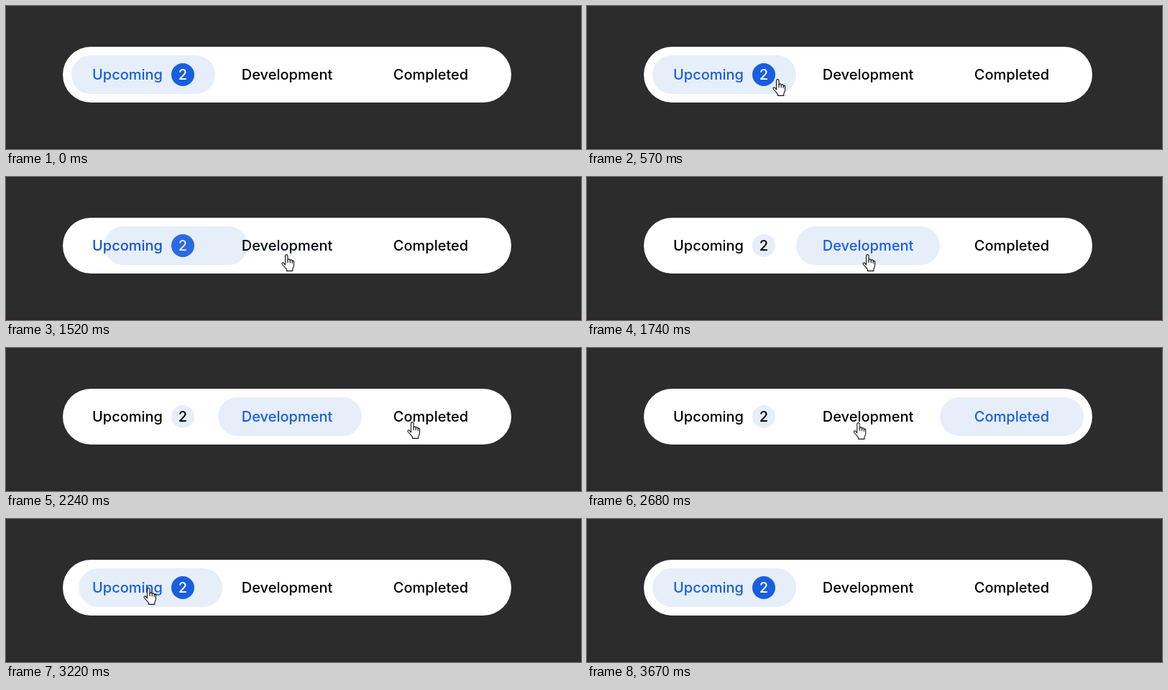
An HTML page that plays this animation: 800x200 px, repeating every 3.97 s.

```html
<!DOCTYPE html>
<html lang="en">
<head>
<meta charset="utf-8">
<title>Tabs</title>
<style>
  :root {
    --loop: 3970ms;
    --primary: #185ee0;
    --secondary: #e6eef9;
  }
  * { box-sizing: border-box; }
  html, body {
    margin: 0;
    width: 100%;
    height: 100%;
    overflow: hidden;
    background: #2c2c2c;
  }
  .stage {
    position: relative;
    width: 800px;
    height: 200px;
    overflow: hidden;
    font: 500 20px Inter, sans-serif;
  }
  .edge {
    position: absolute;
    left: 0;
    bottom: 0;
    width: 100%;
    height: 3px;
    background: #2e2628;
  }
  .tabs {
    position: absolute;
    left: 79px;
    top: 57px;
    display: flex;
    padding: 12px;
    border-radius: 99px;
    background: #fff;
  }
  .tab {
    position: relative;
    display: flex;
    align-items: center;
    justify-content: center;
    width: 200px;
    height: 54px;
    color: #000;
    animation: var(--loop) ease-in infinite;
  }
  .first { animation-name: first; }
  .second { animation-name: second; }
  .third { animation-name: third; }
  .badge {
    display: flex;
    align-items: center;
    justify-content: center;
    width: 32px;
    height: 32px;
    margin-left: 12px;
    border-radius: 50%;
    animation: badge var(--loop) ease-in infinite;
  }
  .glider {
    position: absolute;
    left: 12px;
    top: 12px;
    width: 200px;
    height: 54px;
    border-radius: 99px;
    background: var(--secondary);
    animation: glide var(--loop) ease-out infinite;
  }
  .cursor {
    position: absolute;
    left: -7px;
    top: 0;
    width: 19px;
    height: 25px;
    animation: point var(--loop) ease-in-out infinite;
  }

  /* Clicks at 1485, 2238 and 3002 ms; slides take 250 ms, fades 150 ms */
  @keyframes glide {
    0%, 37.406% { transform: none; }
    43.703%, 56.373% { transform: translateX(200px); }
    62.67%, 75.617% { transform: translateX(400px); }
    81.914%, 100% { transform: none; }
  }
  @keyframes first {
    0%, 37.406% { color: var(--primary); }
    41.184%, 75.617% { color: #000; }
    79.395%, 100% { color: var(--primary); }
  }
  @keyframes second {
    0%, 37.406% { color: #000; }
    41.184%, 56.373% { color: var(--primary); }
    60.151%, 100% { color: #000; }
  }
  @keyframes third {
    0%, 56.373% { color: #000; }
    60.151%, 75.617% { color: var(--primary); }
    79.395%, 100% { color: #000; }
  }
  @keyframes badge {
    0%, 37.406% { color: #fff; background: var(--primary); }
    41.184%, 75.617% { color: #000; background: var(--secondary); }
    79.395%, 100% { color: #fff; background: var(--primary); }
  }
  @keyframes point {
    0%, 5.8% { transform: translate(277px, 204px); animation-timing-function: ease-out; }
    14.3%, 23.8% { transform: translate(265px, 102px); }
    30.4%, 44.4% { transform: translate(390px, 108px); }
    51.1%, 64% { transform: translate(565px, 103px); animation-timing-function: ease-in; }
    67.5% { transform: translate(380px, 104px); animation-timing-function: ease-out; }
    71%, 86.4% { transform: translate(198px, 96px); animation-timing-function: ease-in; }
    92.4%, 100% { transform: translate(193px, 204px); }
  }
</style>
</head>
<body>
<div class="stage">
  <div class="edge"></div>
  <div class="tabs">
    <div class="glider"></div>
    <div class="tab first">Upcoming<span class="badge">2</span></div>
    <div class="tab second">Development</div>
    <div class="tab third">Completed</div>
  </div>
  <svg class="cursor" viewBox="0 0 19 25" fill="#fff" stroke="#111" stroke-width="1.1" stroke-linejoin="round" stroke-linecap="round">
    <path d="M5.5 15V2.4a1.75 1.75 0 0 1 3.5 0V8.4a1.6 1.6 0 0 1 3.2 .2V9.2a1.5 1.5 0 0 1 3 .3V10.2a1.2 1.2 0 0 1 2.3 .7V15.5c0 2.4-1.4 3.6-1.7 5.2V23.4H7.4V21.4C6.4 19.3 3.6 17 1.2 14c-.9-1.4 .8-2.9 2.3-1.7z"/>
    <path fill="none" d="M9 8.4v3.4M12.2 9v3M15.2 10v2.4"/>
  </svg>
</div>
</body>
</html>
```
